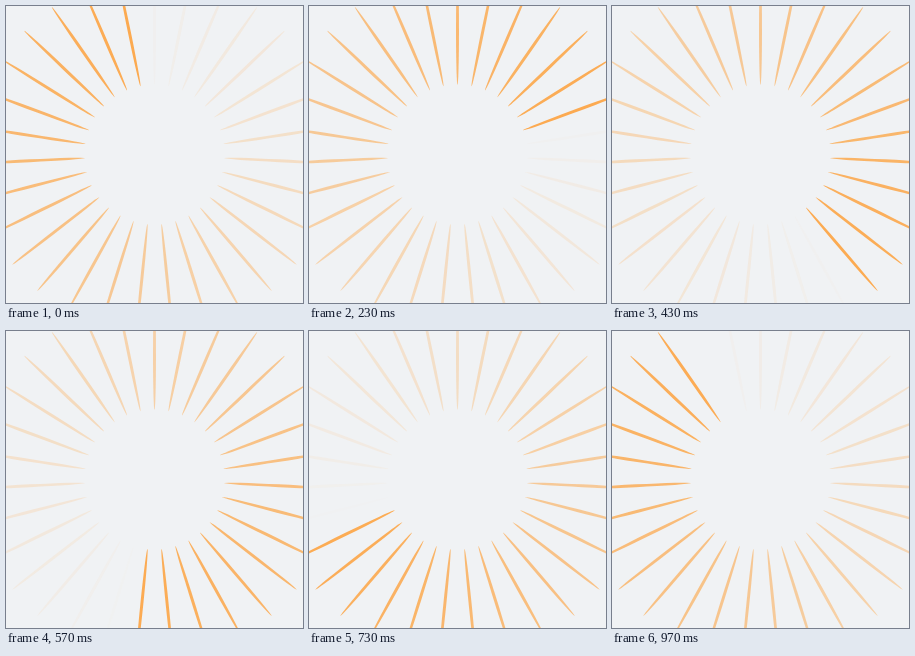
Write an HTML page that moves like this. It is 297x297 px and loops after 1000 ms.

```html
<!DOCTYPE html>
<html lang="en">
<head>
<meta charset="utf-8">
<title>Ray spinner</title>
<style>
  html, body { margin: 0; width: 100%; height: 100%; overflow: hidden; background: #f0f2f4; }
  svg { display: block; width: 100vw; height: 100vh; }
  ellipse { fill: #fcaa50; }
</style>
</head>
<body>
<svg id="stage" viewBox="0 0 100 100"></svg>
<script>
  const RAYS = 31, STEPS = 30, LOOP = 1000;
  const stage = document.getElementById('stage');

  const rays = Array.from({ length: RAYS }, (_, i) => {
    const ray = document.createElementNS('http://www.w3.org/2000/svg', 'ellipse');
    const shape = { cx: 50, cy: 8, rx: 0.5, ry: 18.5, transform: `rotate(${i * 360 / RAYS} 50 50)` };
    for (const key in shape) ray.setAttribute(key, shape[key]);
    return stage.appendChild(ray);
  });

  // 30 steps per second, each starting on a whole 10 ms
  const stepAt = ms => Math.floor((Math.floor(ms / 10) * 3 + 1) / 10);

  function draw(ms) {
    const time = stepAt(ms % LOOP) / STEPS;
    rays.forEach((ray, i) => {
      const phase = (time + (RAYS - 1 - i) / RAYS) % 1;
      ray.style.opacity = 1 - phase;
    });
  }

  function tick() {
    draw(performance.now());
    requestAnimationFrame(tick);
  }
  tick();
</script>
</body>
</html>
```
